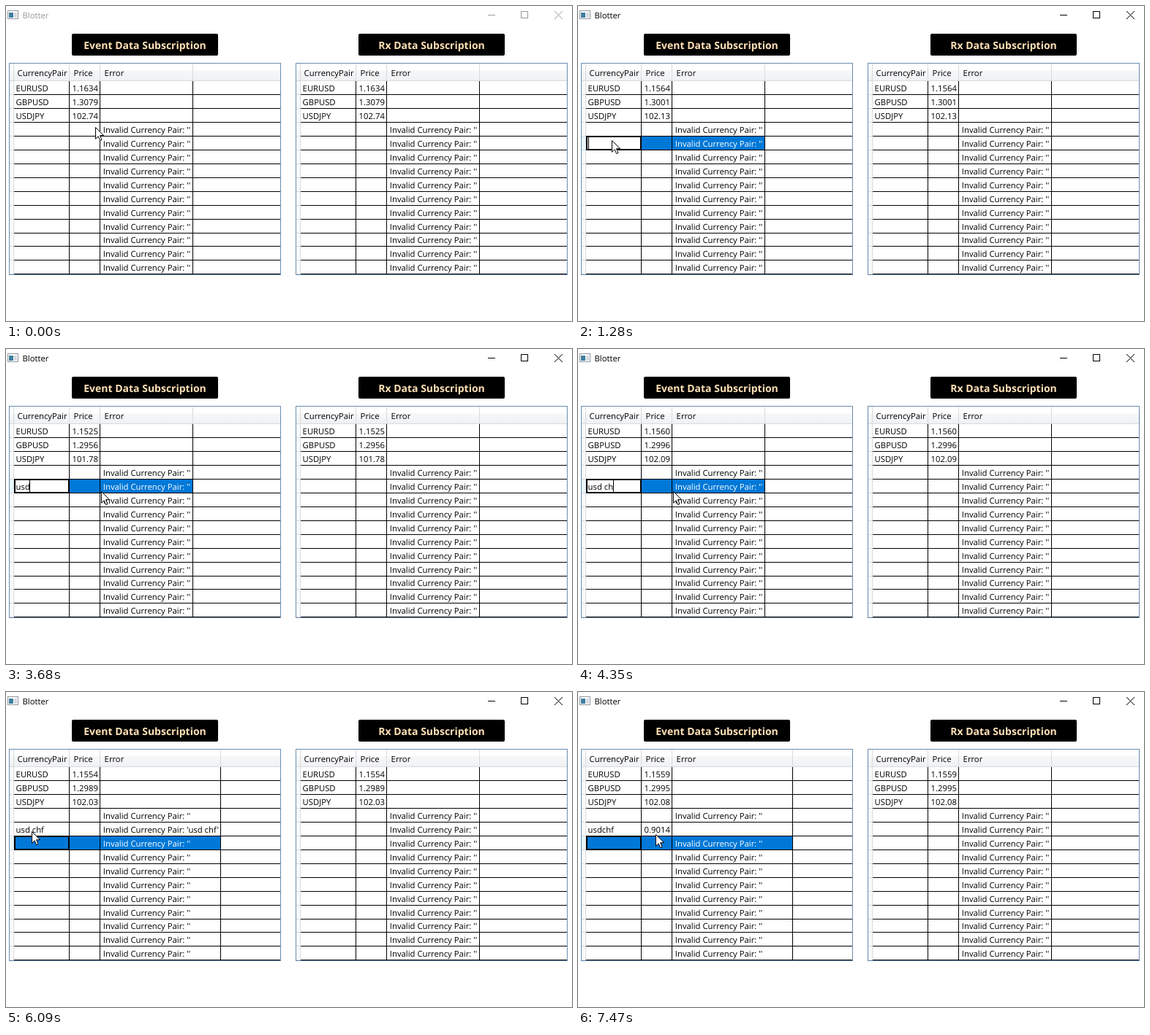
Recreate the animation shown at these times as an HTML page. Size 774 by 432 pixels, loop 8000 ms.

```html
<!DOCTYPE html>
<html lang="en">
<head>
<meta charset="utf-8">
<title>Blotter</title>
<style>
  html, body { margin: 0; width: 100%; height: 100%; overflow: hidden; background: #fff; }
  svg { display: block; width: 774px; height: 432px; }
  text {
    font: 11.3px "Open Sans", "Noto Sans", sans-serif;
    white-space: pre;
    text-rendering: geometricPrecision;
  }
  .heading { font-size: 14px; font-weight: 700; fill: #ffe0b5; text-anchor: middle; }
  .line { fill: none; stroke: #000; shape-rendering: crispEdges; }
  .soft { fill: none; stroke: #d8dade; shape-rendering: crispEdges; }
</style>
</head>
<body>
<svg id="stage" viewBox="0 0 774 432">
  <defs>
    <linearGradient id="head" x2="0" y2="1">
      <stop offset="0" stop-color="#fff"/>
      <stop offset=".4" stop-color="#fff"/>
      <stop offset=".41" stop-color="#f7f8fa"/>
      <stop offset="1" stop-color="#f0f1f3"/>
    </linearGradient>
  </defs>
  <g id="icon" shape-rendering="crispEdges">
    <rect x="2.5" y="6.5" width="14" height="11" fill="#fff" stroke="#8f979d"/>
    <rect x="4" y="9" width="6" height="7" fill="#3f7f9f"/>
    <rect x="11" y="9" width="4" height="7" fill="#d5dade"/>
  </g>
  <text id="caption" x="22.5" y="17">Blotter</text>
  <g id="controls" fill="none">
    <path d="M659 12.5h10M704.5 7.5h9v9h-9z" shape-rendering="crispEdges"/>
    <path d="M750 7l11 11M761 7l-11 11"/>
  </g>
</svg>
<script>
const LOOP = 8000, ROWS = 14, BLINK = 530;
const stage = document.getElementById('stage');
const caption = document.getElementById('caption');
const controls = document.getElementById('controls');

// Each entry holds from its time until the next one.
const prices = [
  [0, '1.1634', '1.3079', '102.74'],
  [270, '1.1604', '1.3046', '102.48'],
  [1270, '1.1564', '1.3001', '102.13'],
  [2280, '1.1525', '1.2956', '101.78'],
  [4260, '1.1560', '1.2996', '102.09'],
  [5210, '1.1554', '1.2989', '102.03'],
  [6210, '1.1559', '1.2995', '102.08']
];
const selection = [
  [0, -1], [560, 5], [1080, 4], [1280, 4, 'edit'],
  [5010, 5], [6220, 4], [6420, 4, 'edit'], [7470, 5]
];
const typed = [
  [0, ''], [3410, 'u'], [3480, 'us'], [3680, 'usd'], [3960, 'usd '],
  [4160, 'usd c'], [4350, 'usd ch'], [4690, 'usd chf'], [7210, 'usdchf']
];
const caretResets = [[0, 0], [1550, 0], [3410, 1], [3480, 2], [3680, 3], [3960, 4],
  [4160, 5], [4350, 6], [4690, 7], [6420, 3]];
const pointerPath = [
  [0, 122, 166], [70, 122, 166], [240, 104, 211], [400, 68, 233], [560, 50, 203],
  [800, 46, 179], [870, 44, 176], [940, 44, 176], [1080, 44, 183], [1280, 46, 184],
  [1680, 130, 195], [5620, 130, 195], [5760, 95, 185], [5940, 42, 188],
  [6090, 35, 191], [6350, 36, 189], [6490, 106, 195]
];

// The eleventh row is one pixel shorter for its text, the twelfth for its rule.
const lineY = k => 102 + 19 * k - (k > 11 ? 1 : 0);
const baseY = k => 117 + 19 * k - (k > 10 ? 1 : 0);
const at = (track, t) => track.findLast(step => step[0] <= t);

function add(parent, tag, attrs, content = '') {
  const node = document.createElementNS('http://www.w3.org/2000/svg', tag);
  setAttrs(node, attrs);
  node.textContent = content;
  parent.append(node);
  return node;
}

function setAttrs(node, attrs) {
  for (const name in attrs) node.setAttribute(name, attrs[name]);
}

function setText(node, value) {
  if (node.textContent !== value) node.textContent = value;
}

const show = (node, visible) => node.setAttribute('visibility', visible ? 'visible' : 'hidden');

function buildGrid(x, heading) {
  const g = add(stage, 'g', { transform: `translate(${x})` });
  add(g, 'rect', { x: 90, y: 38, width: 200, height: 30, rx: 2 });
  add(g, 'text', { x: 190, y: 59, class: 'heading' }, heading);
  add(g, 'rect', { x: 5, y: 79, width: 370, height: 23, fill: 'url(#head)' });
  add(g, 'rect', { x: 5, y: 103, width: 5, height: 265, fill: '#fbfbfc' });
  const mark = add(g, 'rect', { x: 5, width: 5, height: 18, fill: '#e8f6fd' });
  const fill = add(g, 'rect', { x: 11, height: 18, fill: '#0078d7' });

  let rules = '', ticks = 'M5 102.5H375M10.5 79V368M86.5 79V102M128.5 79V102';
  for (let k = 1; k <= ROWS; k++) {
    rules += `M11 ${lineY(k) + .5}H375`;
    ticks += `M5 ${lineY(k) + .5}H10`;
  }
  add(g, 'path', { d: ticks, class: 'soft' });
  add(g, 'path', { d: rules + 'M86.5 103V368M128.5 103V368', class: 'line' });
  const edgeHead = add(g, 'path', { class: 'soft' });
  const edge = add(g, 'path', { class: 'line' });
  add(g, 'rect', { x: 4.5, y: 78.5, width: 371, height: 290, fill: 'none',
    stroke: '#688caf', 'shape-rendering': 'crispEdges' });

  const focus = add(g, 'rect', { x: 12, width: 74, height: 18, class: 'line', 'stroke-width': 2 });
  [['CurrencyPair', 15.6], ['Price', 92.6], ['Error', 134.6]]
    .forEach(([label, left]) => add(g, 'text', { x: left, y: 96 }, label));

  const cells = Array.from({ length: ROWS }, (_, k) =>
    [13.6, 90.6, 132.8].map(left => add(g, 'text', { x: left, y: baseY(k) })));
  ['EURUSD', 'GBPUSD', 'USDJPY'].forEach((pair, k) => setText(cells[k][0], pair));
  for (let k = 3; k < ROWS; k++) setText(cells[k][2], "Invalid Currency Pair: ''");

  function setEdge(right) {
    edgeHead.setAttribute('d', `M${right}.5 79V102`);
    edge.setAttribute('d', `M${right}.5 103V368`);
    fill.setAttribute('width', right - 11);
  }

  function select(row, editing) {
    [mark, fill, focus].forEach(node => show(node, row >= 0));
    if (row >= 0) {
      const y = lineY(row) + 1;
      mark.setAttribute('y', y);
      fill.setAttribute('y', y);
      setAttrs(focus, { y, style: `fill:${editing ? '#fff' : 'none'}` });
    }
    cells.forEach((line, k) => line.forEach((cell, col) =>
      cell.setAttribute('fill', k === row && !(editing && col === 0) ? '#fff' : '#000')));
  }

  setEdge(255);
  select(-1);
  return { g, cells, setEdge, select };
}

const left = buildGrid(0, 'Event Data Subscription');
const right = buildGrid(392, 'Rx Data Subscription');
const caret = add(left.g, 'rect', { y: 180, width: 1, height: 16 });
const pointer = add(stage, 'path', {
  d: 'M.5.5V16.3L4.2 12.8 6.6 18.5 9 17.5 6.6 11.7H11.6z', fill: '#fff', stroke: '#000'
});

function pointerAt(t) {
  const i = pointerPath.findLastIndex(p => p[0] <= t);
  const a = pointerPath[i], b = pointerPath[i + 1] || a;
  const f = b === a ? 0 : (t - a[0]) / (b[0] - a[0]);
  return [1, 2].map(n => Math.round(a[n] + (b[n] - a[n]) * f));
}

function draw(t) {
  const active = t >= 560;
  caption.setAttribute('fill', active ? '#000' : '#999');
  controls.setAttribute('stroke', active ? '#000' : '#999');

  const quote = at(prices, t);
  for (const grid of [left, right])
    for (let k = 0; k < 3; k++) setText(grid.cells[k][1], quote[k + 1]);

  const [, row, mode] = at(selection, t);
  left.setEdge(t < 5010 ? 255 : 293);
  left.select(row, mode === 'edit');

  const [entry, price, error] = left.cells[4];
  const priced = t >= 7470;
  setText(entry, at(typed, t)[1]);
  setText(price, priced ? '0.9014' : '');
  setText(error, priced ? '' : `Invalid Currency Pair: '${t < 5010 ? '' : 'usd chf'}'`);

  const [since, count] = at(caretResets, t);
  show(caret, mode === 'edit' && Math.floor((t - since) / BLINK) % 2 === 0);
  const advance = count ? entry.getSubStringLength(0, count) : 0;
  caret.setAttribute('x', Math.max(14, Math.round(13 + advance)));

  pointer.setAttribute('transform', `translate(${pointerAt(t)})`);
}

const start = performance.now();
function tick() {
  draw((performance.now() - start) % LOOP);
  requestAnimationFrame(tick);
}
tick();
</script>
</body>
</html>
```
